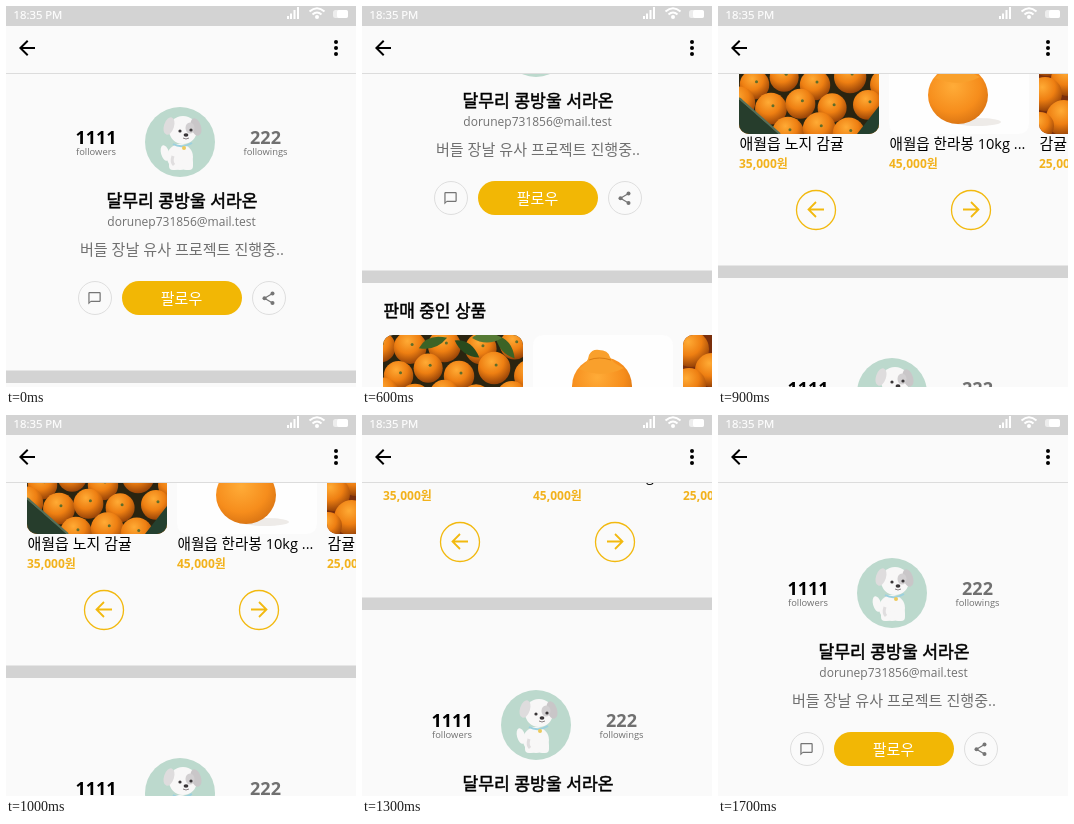
Animation of 350 by 381 pixels, one loop 2.6 s. Source, as an HTML page:

```html
<!DOCTYPE html>
<html lang="ko">
<head>
<meta charset="utf-8">
<style>
html, body { margin: 0; width: 100%; height: 100%; overflow: hidden; background: #fafafa; }
svg { display: block; }
text { font-family: "Open Sans", "Noto Sans CJK KR", "Noto Sans CJK JP", sans-serif; }
.mid { text-anchor: middle; }
.bold { font-weight: 700; }
.heading { stroke: #000; stroke-width: .5; }
.grey { fill: #707070; }
.price { font-size: 12px; font-weight: 700; fill: #f2b21c; }
.ring { fill: #fafafa; stroke: #dedede; }
.icon { fill: #757575; }
.nav { fill: none; stroke: #f2b90f; stroke-width: 1.3; }
</style>
</head>
<body>
<svg width="350" height="381" viewBox="0 0 350 381">
  <defs>
    <radialGradient id="peel" cx=".42" cy=".3" r=".75">
      <stop offset="0" stop-color="#ffab35"/>
      <stop offset=".5" stop-color="#ee7f12"/>
      <stop offset="1" stop-color="#8a3a06"/>
    </radialGradient>
    <radialGradient id="softPeel" cx=".42" cy=".35" r=".75">
      <stop offset="0" stop-color="#ffac38"/>
      <stop offset=".6" stop-color="#f68d1c"/>
      <stop offset="1" stop-color="#d06c10"/>
    </radialGradient>
    <clipPath id="card"><rect width="140" height="90" rx="10"/></clipPath>
    <path id="arrow" d="M8 0H-7M0-7.500L-7.500 0 0 7.500"/>
    <path id="leaf" d="M-15 0Q-2-11 15 0Q0 9-15 0"/>

    <g id="profile">
      <circle cx="174" cy="136" r="35" fill="#bcd9cd"/>
      <g fill="#f8f7f7">
        <ellipse cx="159" cy="147" rx="4" ry="8" transform="rotate(-15 159 147)"/>
        <ellipse cx="174" cy="151" rx="13" ry="13"/>
        <rect x="163" y="152" width="10" height="12" rx="4"/>
        <rect x="176" y="152" width="11" height="12" rx="4"/>
        <ellipse cx="177" cy="124" rx="14" ry="14"/>
      </g>
      <ellipse cx="163" cy="120" rx="5" ry="9" fill="#dedcdd" transform="rotate(18 163 120)"/>
      <ellipse cx="190" cy="121" rx="5" ry="9" fill="#c9c6c8" transform="rotate(-18 190 121)"/>
      <ellipse cx="184" cy="122" rx="4.5" ry="5.5" fill="#d2cfd1"/>
      <path d="M167 150q-2 6 1 9" fill="none" stroke="#e0dedf" stroke-width="3"/>
      <path d="M167 138q9 5 19-1" fill="none" stroke="#9bd0df" stroke-width="2"/>
      <circle cx="178" cy="142" r="2" fill="#ecc95c"/>
      <g fill="#3a3638">
        <circle cx="174" cy="125" r="1.6"/>
        <circle cx="185" cy="124" r="1.6"/>
        <ellipse cx="180" cy="129" rx="2.4" ry="1.8"/>
      </g>
      <path d="M177 132q3 2 6 0" fill="none" stroke="#8a8284"/>

      <g class="mid">
        <text class="bold" x="90" y="138" font-size="18">1111</text>
        <text class="grey" x="90" y="149" font-size="9.4">followers</text>
        <text class="bold grey" x="259.5" y="138" font-size="18">222</text>
        <text class="grey" x="259.5" y="149" font-size="9.4">followings</text>
        <text class="heading" x="176" y="201" font-size="17.2">달무리 콩방울 서라온</text>
        <text class="grey" x="175.5" y="220" font-size="12">dorunep731856@mail.test</text>
        <text class="grey" x="176" y="249" font-size="15.1">버들 장날 유사 프로젝트 진행중..</text>
      </g>

      <circle class="ring" cx="89" cy="292" r="16.5"/>
      <path class="icon" transform="translate(81.1 284.800) scale(.62)" d="M20 2H4c-1.100 0-2 .9-2 2v18l4-4h14c1.100 0 2-.9 2-2V4c0-1.100-.9-2-2-2zm0 14H6l-2 2V4h16v12z"/>
      <rect x="116" y="275" width="120" height="34" rx="17" fill="#f2b705"/>
      <text class="mid" x="175.5" y="297.5" font-size="15" fill="#fff">팔로우</text>
      <circle class="ring" cx="263" cy="292" r="16.5"/>
      <g class="icon">
        <path d="M266.500 287.500L258.500 292.300 266.500 297" fill="none" stroke="#757575" stroke-width="1.2"/>
        <circle cx="266.5" cy="287.5" r="2"/>
        <circle cx="258.5" cy="292.3" r="2"/>
        <circle cx="266.5" cy="297" r="2"/>
      </g>
      <path d="M0 364.500h350v12.500H0z" fill="#d3d3d3"/>
    </g>
  </defs>

  <rect width="350" height="381" fill="#fafafa"/>
  <g id="page">
    <use href="#profile"/>
    <text class="heading" x="21.5" y="411" font-size="17">판매 중인 상품</text>

    <g transform="translate(21 429)" clip-path="url(#card)">
      <rect width="140" height="90" fill="#2a2410"/>
      <g id="crate"></g>
      <g fill="#3c6326">
        <use href="#leaf" transform="translate(50 8) rotate(-20)"/>
        <use href="#leaf" transform="translate(84 14) rotate(35)" fill="#284a1d"/>
        <use href="#leaf" transform="translate(122 12) rotate(50)"/>
        <use href="#leaf" transform="translate(104 3)" fill="#557a34"/>
      </g>
      <path d="M0 55L40 90H0z" fill="#263d2c"/>
      <path d="M0 54L41 90" stroke="#55705a" stroke-width="2"/>
      <path d="M140 62L118 90H140z" fill="#24402f"/>
    </g>
    <g transform="translate(171 429)" clip-path="url(#card)">
      <rect width="140" height="90" fill="#fefefe"/>
      <ellipse cx="88" cy="78" rx="24" ry="4" fill="#eeebe8"/>
      <ellipse cx="69" cy="51" rx="30" ry="29" fill="url(#softPeel)"/>
      <path d="M46 34Q55 28 56 20Q59 14 66 15Q75 15 77 22Q79 28 91 33Q70 44 46 34" fill="#f9a02c"/>
      <path d="M56 25Q66 21 78 25" fill="none" stroke="#d97c12"/>
    </g>
    <g transform="translate(321 429)" clip-path="url(#card)">
      <rect width="140" height="90" fill="#7a2f0c"/>
      <g fill="url(#peel)">
        <circle cx="8" cy="14" r="18"/>
        <circle cx="29" cy="35" r="17"/>
        <circle cx="6" cy="50" r="17"/>
        <circle cx="25" cy="74" r="18"/>
        <circle cx="1" cy="82" r="14"/>
      </g>
    </g>

    <g font-size="15">
      <text x="21.5" y="533.5">애월읍 노지 감귤</text>
      <text x="171.5" y="533.5" font-size="14.6">애월읍 한라봉 10kg ...</text>
      <text x="321.5" y="533.5">감귤 5kg</text>
    </g>
    <g class="price">
      <text x="21" y="552.5">35,000원</text>
      <text x="171" y="552.5">45,000원</text>
      <text x="321" y="552.5">25,000원</text>
    </g>
    <g class="nav">
      <circle cx="98" cy="595" r="19.5"/>
      <use href="#arrow" x="98" y="594.5" stroke-width="1.8"/>
      <circle cx="253" cy="595" r="19.5"/>
      <use href="#arrow" transform="translate(253 594.500) scale(-1 1)" stroke-width="1.8"/>
    </g>
    <path d="M0 650.500h350v12.500H0z" fill="#d3d3d3"/>
    <use href="#profile" y="642"/>
  </g>

  <path d="M0 0h350v68H0z" fill="#fafafa"/>
  <path d="M0 67h350v1H0z" fill="#dcdcdc"/>
  <path d="M0 0h350v20H0z" fill="#d3d3d3"/>
  <g fill="#fff">
    <text x="7.5" y="13" font-size="11.3" stroke="#fff" stroke-width=".2">18:35 PM</text>
    <path d="M281 10h2v3h-2zM284 7.500h2V13h-2zM287.500 4h2v9h-2zM291 1h2v12h-2z"/>
    <circle cx="311" cy="11" r="2"/>
    <rect x="327" y="4" width="15" height="8" rx="2.500" opacity=".6"/>
    <rect x="331" y="4" width="11" height="8" rx="2"/>
  </g>
  <path d="M303.500 5.500q7.500-6.500 15 0M306.500 8.500q4.500-4 9 0" fill="none" stroke="#fff" stroke-width="2"/>
  <path d="M29 41H16.830l5.590-5.590L21 34l-8 8 8 8 1.410-1.410L16.830 43H29z"/>
  <circle cx="330" cy="36" r="2"/>
  <circle cx="330" cy="42" r="2"/>
  <circle cx="330" cy="48" r="2"/>
</svg>
<script>
const LOOP = 2600;
// [time in ms, scroll offset]: stepped wheel scrolling
const STEPS = [
  [0, 0], [400, 6], [500, 84], [600, 100], [800, 190], [900, 391], [1000, 400],
  [1200, 402], [1300, 468], [1400, 499], [1500, 502], [1600, 578], [1700, 600]
];
const page = document.getElementById("page");

// Rows of tangerines, alternately shifted
let fruit = "";
for (let row = 0; row < 4; row++) {
  for (let col = 0; col < 5; col++) {
    const x = col * 33 + (row % 2) * 16 - 3 + 3 * Math.sin(col * 5 + row);
    const y = row * 25 + 12 + 4 * Math.sin(col * 3 + row * 2);
    fruit += `<circle cx="${x}" cy="${y}" r="${15.5 + Math.sin(col + row * 4)}" fill="url(#peel)"/>`;
    fruit += `<circle cx="${x + 2}" cy="${y - 3}" r="1.5" fill="#5f6d2a"/>`;
  }
}
document.getElementById("crate").innerHTML = fruit;

function draw() {
  const time = performance.now() % LOOP;
  const [, scroll] = STEPS.findLast(([start]) => start <= time);
  page.setAttribute("transform", `translate(0 ${-scroll})`);
  requestAnimationFrame(draw);
}
draw();
</script>
</body>
</html>
```
